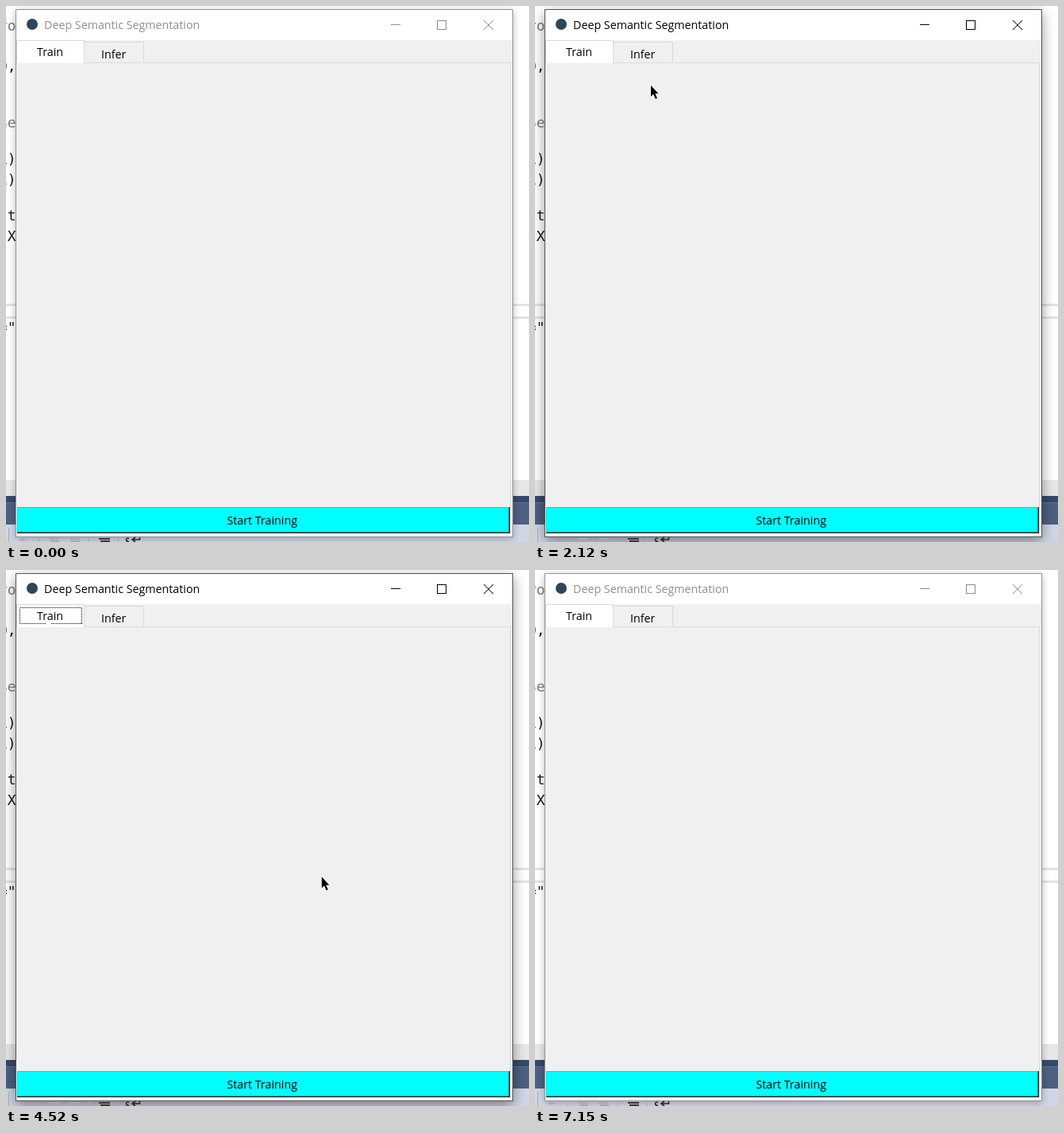
An HTML page that plays this animation: 659x675 px, repeating every 7.22 s.

```html
<!DOCTYPE html>
<html lang="en">
<head>
<meta charset="utf-8">
<title>Deep Semantic Segmentation</title>
<style>
  html, body { margin: 0; width: 100%; height: 100%; overflow: hidden; background: #fff; }
  svg { display: block; width: 659px; height: 675px; }
  text { white-space: pre; }
  .ui { font: 14.25px "Open Sans", "Noto Sans", sans-serif; fill: #000; }
  .code { font: 18px "DejaVu Sans Mono", monospace; fill: #1c1c1c; }
  .code .dim { fill: #7b807c; }
  .crisp { shape-rendering: crispEdges; }
  #frame { fill: #f0f0f0; stroke: #969696; filter: drop-shadow(0 2px 5px rgba(0,0,0,.28)); }
  #caption { fill: #8e8e8e; }
  #controls { stroke: #8e8e8e; fill: none; }
  .active #frame { stroke: #565656; filter: drop-shadow(0 5px 8px rgba(0,0,0,.42)); }
  .active #caption { fill: #000; }
  .active #controls { stroke: #000; }
</style>
</head>
<body>
<svg id="stage" viewBox="0 0 659 675">
  <!-- editor behind the window -->
  <rect width="659" height="675" fill="#fff"/>
  <g class="crisp">
    <path d="M0 376H659M0 392.5H659" stroke="#e3e3e6" stroke-width="3"/>
    <rect y="597" width="659" height="20" fill="#e7e7e8"/>
    <rect y="617" width="659" height="9" fill="#35496a"/>
    <rect y="625" width="659" height="1" fill="#5f7397"/>
    <rect y="626" width="659" height="27" fill="#4d6082"/>
    <rect y="653" width="659" height="22" fill="#cfd6e5"/>
  </g>
  <g class="code" id="code"></g>

  <!-- window -->
  <rect id="frame" x="12.5" y="4.5" width="626" height="664"/>
  <g class="crisp">
    <path d="M3.5 657V675M41.5 669V675M104.5 669V675M141.5 669V675" stroke="#a3a8b6"/>
    <path d="M17 672H24M54 670.5H67M56 674H67M80 670.5H93M82 674H93" stroke="#a4a7b2" stroke-width="2"/>
    <path d="M117 670.5H131M119 674H131" stroke="#38323c" stroke-width="2"/>
  </g>
  <g fill="none" stroke="#29242c" stroke-width="1.6">
    <path d="M155 670.5Q151.5 669.5 151.5 672T155 674.5M168.500 669V672H159M163 669L159 672L163 675"/>
  </g>
  <rect x="13" y="5" width="625" height="38" fill="#fff"/>
  <circle cx="33" cy="23" r="7" fill="#2d4758"/>
  <text id="caption" class="ui" x="48" y="29">Deep Semantic Segmentation</text>
  <g id="controls">
    <path class="crisp" d="M485 23.500H497M543.500 18.500H554.500V29.500H543.500Z"/>
    <path d="M602 18L614 30M614 18L602 30"/>
  </g>

  <path class="crisp" d="M13.500 71.500H635.500V665" fill="none" stroke="#dcdcdc"/>
  <path class="crisp" d="M13 665.500H636" stroke="#fafafa"/>
  <g id="tabs"></g>

  <g id="raised">
    <g class="crisp">
      <rect x="14" y="631" width="621" height="33" fill="#0ff"/>
      <path d="M14.500 663V631.500H634" fill="none" stroke="#00d6da"/>
      <path d="M15 662.500H633.500V632" fill="none" stroke="#009a9c"/>
      <path d="M14 663.500H634.500V631" fill="none" stroke="#101818"/>
    </g>
    <text class="ui" x="278.500" y="653">Start Training</text>
  </g>
  <g id="sunken">
    <g class="crisp">
      <rect x="14" y="631" width="621" height="33" fill="#f0f0f0"/>
      <path d="M14.500 663V631.500H634" fill="none" stroke="#a0a0a0"/>
      <path d="M15.500 662V632.500H633" fill="none" stroke="#696969"/>
      <path d="M15 662.500H633.500V632" fill="none" stroke="#e3e3e3"/>
      <path d="M14 663.500H634.500V631" fill="none" stroke="#fff"/>
    </g>
    <text class="ui" x="279.500" y="654">Start Training</text>
  </g>

  <g id="pointer">
    <circle id="halo" r="15" fill="#fff000" fill-opacity=".6"/>
    <path d="M0 0V14L3.200 11L5.800 17L8 16L5.400 10.200H9.500Z" fill="#000"
      stroke="#fff" stroke-opacity=".75" stroke-width=".8" paint-order="stroke"/>
  </g>
</svg>
<script>
const LOOP = 7220;
const $ = id => document.getElementById(id);
const show = (el, on) => el.setAttribute('visibility', on ? 'visible' : 'hidden');
const within = (t, spans) => spans.some(([a, b]) => t >= a && t < b);

// Slivers of code left of the window: text, baseline, dimmed
const CODE = [['ro', 31, 1], [') ', 56], ['0,', 82], ['Se', 153, 1], ['1)', 199],
  ['1)', 225], [' t', 270], [' X', 296], ['="', 411]];
$('code').innerHTML = CODE.map(([s, y, dim]) =>
  `<text x="-9" y="${y}"${dim ? ' class="dim"' : ''}>${s}</text>`).join('');

// Pointer moves: start, end, steps, from, to, optional bend
const MOVES = [
  [120, 440, 6, [521, 676], [517, 639]],
  [1860, 2120, 5, [517, 639], [146, 100]],
  [2300, 2560, 5, [146, 100], [125, 71]],
  [2700, 2760, 2, [125, 71], [125, 66]],
  [3270, 3520, 5, [125, 66], [61, 60]],
  [3700, 3750, 2, [61, 60], [58, 56]],
  [4250, 4570, 6, [58, 56], [425, 413]],
  [4820, 5540, 12, [425, 413], [337, 645], [550, 560]],
  [6350, 6540, 4, [337, 645], [474, 680]]
];
const PRESSES = [[620, 690], [1300, 1360], [5590, 5660], [6090, 6150]];
const TAB_CLICKS = [[2820, 2890], [3880, 3950]];
const ACTIVE = [[620, 7150]];
const INFER = [[2820, 3880]];
const FOCUS = [[2820, 7150]];

function pointerAt(t) {
  let move = MOVES[0];
  for (const m of MOVES) if (t >= m[0]) move = m;
  const [start, end, steps, from, to, bend] = move;
  if (t < start) return from;
  const gap = (end - start) / (steps - 1);
  const p = Math.min(steps, Math.floor((t - start) / gap + 1e-6) + 1) / steps;
  const e = p * p * (3 - 2 * p);
  return from.map((a, i) => {
    const c = bend ? bend[i] : (a + to[i]) / 2;
    return a * (1 - e) ** 2 + 2 * c * e * (1 - e) + to[i] * e * e;
  });
}

// Edges [left, right] of each tab when idle and when selected
const TABS = [
  { name: 'Train', textX: 39, idle: [15.5, 94.5], on: [13.5, 98.5], dots: [17.5, 78] },
  { name: 'Infer', textX: 120, idle: [98.5, 173.5], on: [95.5, 175.5], dots: [98.5, 74] }
];
$('tabs').innerHTML = TABS.map(tab => `<g>
  <path class="crisp" stroke="#d9d9d9"/>
  <rect class="crisp" x="${tab.dots[0]}" y="47.5" width="${tab.dots[1]}" height="20"
    fill="none" stroke="#000" stroke-dasharray="1 1"/>
  <text class="ui" x="${tab.textX}">${tab.name}</text></g>`).join('');

function drawTab(i, selected, focused, [x, y]) {
  const tab = TABS[i];
  const [face, dots, label] = $('tabs').children[i].children;
  const [l, r] = selected ? tab.on : tab.idle;
  const hover = !selected && x > l && x < r && y > 45 && y < 71;
  const top = selected ? 43.5 : 45.5;
  face.setAttribute('d', `M${l} ${selected ? 72 : 71}V${top}H${r}V${selected ? 72 : 71}`);
  face.setAttribute('fill', selected ? '#fff' : hover ? '#d8eaf9' : '#f0f0f0');
  label.setAttribute('y', selected ? 63 : 65.5);
  show(dots, selected && focused);
}

function render(t) {
  const pos = pointerAt(t);
  const infer = within(t, INFER);
  const pressed = within(t, PRESSES);
  const focused = within(t, FOCUS);
  $('stage').classList.toggle('active', within(t, ACTIVE));
  drawTab(0, !infer, focused, pos);
  drawTab(1, infer, focused, pos);
  show($('raised'), !infer && !pressed);
  show($('sunken'), !infer && pressed);
  $('pointer').setAttribute('transform', `translate(${pos[0].toFixed(1)} ${pos[1].toFixed(1)})`);
  show($('pointer'), t >= 120 && t < 6540);
  show($('halo'), pressed || within(t, TAB_CLICKS));
}

const began = performance.now();
function tick() {
  render((performance.now() - began) % LOOP);
  requestAnimationFrame(tick);
}
tick();
</script>
</body>
</html>
```
